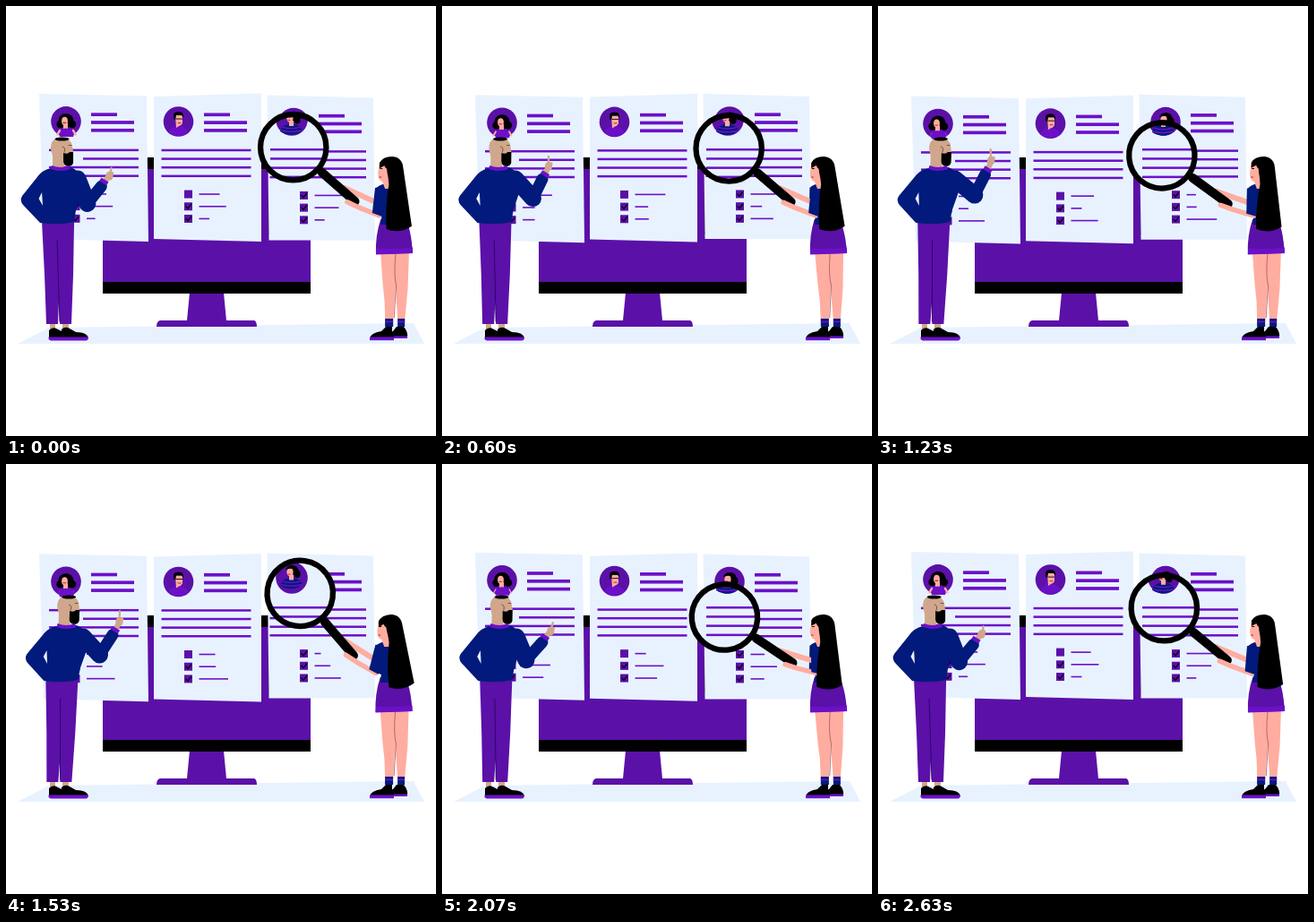
Recreate the animation shown at these times as an HTML page with a canvas. Size 480 by 480 pixels, loop 2.67 s.

```html
<!DOCTYPE html>
<html lang="en">
<head>
<meta charset="utf-8">
<style>
  html, body { margin: 0; width: 100%; height: 100%; overflow: hidden; background: #fff; }
  canvas { display: block; }
</style>
</head>
<body>
<canvas id="stage" width="480" height="480"></canvas>
<script>
const ctx = document.getElementById('stage').getContext('2d');
const LOOP = 2670, STEPS = 80;
const PURPLE = '#5b10a8', VIOLET = '#6c10c8', LIGHT = '#e8f2ff', NAVY = '#021a7b';
const PINK = '#ffada0', TAN = '#d0a78c', BLACK = '#000';

const wave = x => Math.cos(2 * Math.PI * x);

function fill(d, color) {
  ctx.fillStyle = color;
  ctx.fill(new Path2D(d));
}
function stroke(d, color, width, cap = 'round') {
  ctx.strokeStyle = color;
  ctx.lineWidth = width;
  ctx.lineCap = cap;
  ctx.lineJoin = 'round';
  ctx.stroke(new Path2D(d));
}
function disc(x, y, rx, color, ry = rx) {
  ctx.fillStyle = color;
  ctx.beginPath();
  ctx.ellipse(x, y, rx, ry, 0, 0, 7);
  ctx.fill();
}
function rect(x, y, w, h, color) {
  ctx.fillStyle = color;
  ctx.fillRect(x, y, w, h);
}
function group(draw) {
  ctx.save();
  draw();
  ctx.restore();
}
// Leans everything above the ground line sideways.
function lean(k, ground) {
  ctx.transform(1, 0, -k, 1, k * ground, 0);
}
function rotateAt(x, y, degrees) {
  ctx.translate(x, y);
  ctx.rotate(degrees * Math.PI / 180);
  ctx.translate(-x, -y);
}

function scenery() {
  rect(0, 0, 480, 480, '#fff');
  fill('M13 377L48 359 455 354 467 377Z', LIGHT);
  fill('M205 320H243L246 351H277Q280 352 280 358H168Q168 352 172 351H202Z', PURPLE);
  rect(108, 169, 232, 152, BLACK);
  rect(108, 182, 185, 126, PURPLE);
  rect(293, 255, 47, 53, PURPLE);
}

function paragraph(x, y, width, indent = 0, gap = 9.6) {
  for (let i = 0; i < 4; i++) {
    const dx = i === 1 ? indent : 0;
    rect(x + dx, y + i * gap, width - dx, 2.5, VIOLET);
  }
}

function card(c, q) {
  fill(c.shape, LIGHT);
  disc(c.avatar, 129, 16.8, PURPLE);
  c.person(q);
  [[29, 119.4], [48, 128.2], [48, 137]].forEach(([w, y]) => rect(c.title, y, w, 3.7, VIOLET));
  paragraph(c.text, 159.7, c.width, c.indent);
  c.rows.forEach(([length, swing, phase], i) => {
    const y = 210 + i * 13.7;
    rect(c.box - 4.5, y - 4.5, 9, 9, PURPLE);
    if (i || c.tickAll) stroke(`M${c.box - 2.5} ${y}l2 2.3 3.5 -4.5`, BLACK, 1.3);
    rect(c.box + 12, y - .8, length + swing * wave(q - phase), 1.6, VIOLET);
  });
}

function curlyPerson(q) {
  const lift = 1.2 + 1.2 * wave(q - .05);
  disc(67, 128, 8.5, BLACK, 8);
  disc(60.5, 132, 4.2, BLACK);
  disc(74, 132, 4.2, BLACK);
  disc(65.5, 128.5, 3.4, PINK, 4.6);
  fill('M64 131H69V138H64Z', PINK);
  stroke('M64 130.5h2.5', '#c0203a', 1.2);
  fill('M58 139Q66 134 77 139L75 146H60Z', VIOLET);
  stroke('M57.5 143.5L60 139M77.5 143.5L75 139', PINK, lift + .1);
}
function shortHairedPerson() {
  fill('M181 141Q183 135 190 134H195Q201 135 204 141Q193 149 181 141Z', VIOLET);
  fill('M189 122H197V131Q195 134 193 134L190 136Z', PINK);
  fill('M187 126V121Q188 118 193 118Q199 118 198 125L196 122 190 122 189 127Z', BLACK);
  stroke('M190 126h7', BLACK, .9);
  stroke('M192 130.5h3', '#c0203a', 1);
}
function stripedPerson() {
  fill('M308 141Q310 134 317 133H325Q331 135 333 140Q321 149 308 141Z', NAVY);
  stroke('M311 136.5Q320 139 330 136.5M309 140Q320 143 332 140', VIOLET, 1.3);
  disc(322, 124, 6.3, BLACK, 5.5);
  disc(327, 128, 3.6, BLACK, 4.5);
  disc(319, 126, 3.6, PINK, 5);
  fill('M318 129H323V135H318Z', PINK);
  fill('M314 124Q315 118 323 119V123Q318 121 314 124Z', BLACK);
  stroke('M317 128.5h2', '#c0203a', 1);
}

const cards = [
  { shape: 'M37 98L157 100.5 159 263 42 260Z', avatar: 67, person: curlyPerson, title: 95, text: 48,
    width: 100, indent: 38, box: 78, tickAll: true, bob: .47,
    rows: [[22, 11, .25], [21, 12, .87], [20, 11.5, .57]] },
  { shape: 'M165 101L285 97.5V263L165 260Z', avatar: 192.5, person: shortHairedPerson, title: 221, text: 173.5,
    width: 100, indent: 0, box: 203.5, tickAll: false, bob: .58,
    rows: [[23, 11, .25], [22, 12, .87], [21.5, 11, .57]] },
  { shape: 'M291.5 98L410 101 412 260H293.5Z', avatar: 321, person: stripedPerson, title: 349, text: 294.5,
    width: 107.5, indent: 0, box: 332.5, tickAll: true, bob: .78,
    rows: [[20, 13, .08], [20, 11, .86], [22, 12, .43]] }
];

function man(q) {
  const sway = wave(q - .08), raise = wave(q - .93);
  const k = .018 * (1 - wave(q - .03));
  fill('M49 354H55V362H49ZM63 354H70V362H63Z', TAN);
  fill('M48 371V362Q52 358 56 360L64 364 78 370V372Z', BLACK);
  fill('M62 371V361Q66 357 71 360L78 364Q91 364 92 371Z', BLACK);
  fill('M47.5 369.5H92Q92 373.500 89 373.500H50Q47 373 47.500 369.500Z', VIOLET);
  group(() => {
    lean(k, 365);
    fill('M40 241H76L75 300 73 355H60L59 330 58 355H45L43 300Z', PURPLE);
    stroke('M57 262L60 352', '#2b0560', .9);
    fill('M52 164H65V182H52Z', TAN);
    fill('M50 160Q49 147 62 147Q73 147.500 74 157L75 163 74 171H53Z', TAN);
    disc(62.5, 148.5, 8, BLACK, 2);
    fill('M64 164Q69 166 71 163H75V175Q74 179 69 179Q64 178 64 173Z', BLACK);
    disc(64, 160, 2.8, TAN, 3.8);
    stroke('M63 157q4 1 2 6M70 155.500h3', '#704a38', .9);
    fill('M50 181Q40 183 34 192L18 212Q15 217 19 222L38 242Q60 245 76 241L78 228 87 200Q84 184 72 180Z', NAVY);
    fill('M40 208L36.500 215 41 223Z', LIGHT);
    fill('M51 178Q61 182 70 178L72 182Q61 186 50 182Z', VIOLET);
  });
  const elbow = [99 - 9 * raise, 216 + 5 * raise];
  const wrist = [116 - 3.5 * sway - 4 * raise, 190 + 7 * raise];
  const tip = [122 - 5 * sway, 171 + 11 * raise];
  const hand = [(wrist[0] + tip[0]) / 2 + 2, (wrist[1] + tip[1]) / 2 + 1];
  const shoulder = [80 + k * 170, 193];
  stroke(`M${wrist}L${hand}`, TAN, 6);
  disc(...hand, 4.2, TAN, 5);
  stroke(`M${hand}L${tip}`, TAN, 2.3);
  stroke(`M${hand}l3 -3`, TAN, 3.5);
  stroke(`M${shoulder}L${elbow}`, NAVY, 19);
  stroke(`M${elbow}L${wrist[0] - 3},${wrist[1] + 5}`, NAVY, 13);
  stroke(`M${wrist[0] - 4} ${wrist[1] - 3}l8 5`, VIOLET, 4.5, 'butt');
}

function lens(x, y, swing) {
  group(() => {
    ctx.beginPath();
    ctx.arc(x, y, 36, 0, 7);
    ctx.fillStyle = LIGHT;
    ctx.fill();
    ctx.clip();
    disc(319, 127, 17.8, PURPLE);
    paragraph(295, 159, 100, 0, 10.2);
    ctx.translate(-2, -6 * Math.max(0, swing));
    stripedPerson();
  });
}

function womanBody(p) {
  fill('M406 371Q407 365 419 363L424 358H431V371Z', BLACK);
  fill('M420 371Q425 365 432 363L436 358H444Q449 364 448 370Z', BLACK);
  rect(406, 369.5, 27, 3.7, VIOLET);
  rect(433, 368.5, 15, 2.5, VIOLET);
  group(() => {
    lean(.01 * wave(p), 370);
    fill('M417 274H434L435 302 432 351H423Q423 330 420 310Z', PINK);
    fill('M433 274H449L448 315 445 351H437L434 310Z', PINK);
    stroke('M434 277Q432 300 435 312L433 348', '#a75560', .8);
    rect(423, 349, 9, 9, NAVY);
    rect(437, 349, 8, 9, NAVY);
    stroke('M423 352.500h9M437 352.500h8', VIOLET, 1.4, 'butt');
    fill('M417 238H444Q451 247 453 276L412 277Q411 256 417 238Z', PURPLE);
    fill('M412.500 270.500Q435 272 453 269.500V276L412 277.500Z', VIOLET);
    fill('M412 203Q417 198 426 198L441 200 443 214 442 244H417L418 235 411 232Z', NAVY);
  });
}

function womanHead(p, swing) {
  group(() => {
    lean(.0125 * wave(p), 370);
    fill('M415 174L413 186Q413 195 418 196L421 204H431V172Z', PINK);
    stroke('M415.500 181.500h2', BLACK, 1);
    stroke('M414.500 191h2', '#c0203a', 1);
    rotateAt(430, 178, -4 * swing);
    fill('M414.500 175Q418 168 429 168Q440 169 441 181L450.500 246Q437 255 422 249Q421 222 425 199Q424 184 420 178Q418 179 414.500 181Z', BLACK);
    disc(420.5, 184, 2.5, PINK, 3.3);
  });
}

function magnifier(swing) {
  const angle = 11.1 * swing - 1.8;
  const rad = (25.2 + angle) * Math.PI / 180;
  lens(420 - 110 * Math.cos(rad), 205 - 110 * Math.sin(rad), swing);
  group(() => {
    rotateAt(420, 205, angle);
    stroke('M413 219L377 203', PINK, 6);
    const ring = new Path2D();
    ring.arc(320.5, 158.2, 36.7, 0, 7);
    ctx.strokeStyle = BLACK;
    ctx.lineWidth = 6.3;
    ctx.stroke(ring);
    group(() => {
      rotateAt(320.5, 158.2, 41);
      rect(356, 154.7, 10, 7, BLACK);
      stroke('M363 158.200H412', BLACK, 10);
    });
    stroke('M417 234L394 225 381 219', PINK, 5.5);
    fill('M412 203Q422 200 424 211L420 235 409 231Z', NAVY);
  });
}

function draw(now) {
  // Quarter-step offset absorbs the rounding of step times.
  const q = Math.floor((now % LOOP) / LOOP * STEPS + .25) / STEPS;
  const p = 2 * q;
  const swing = Math.sin(2 * Math.PI * (p + .03));
  scenery();
  cards.forEach(c => group(() => {
    ctx.translate(0, 1.2 + 1.3 * wave(q - c.bob));
    card(c, q);
  }));
  man(q);
  womanBody(p);
  magnifier(swing);
  womanHead(p, swing);
}

function tick() {
  draw(performance.now());
  requestAnimationFrame(tick);
}
tick();
</script>
</body>
</html>
```
